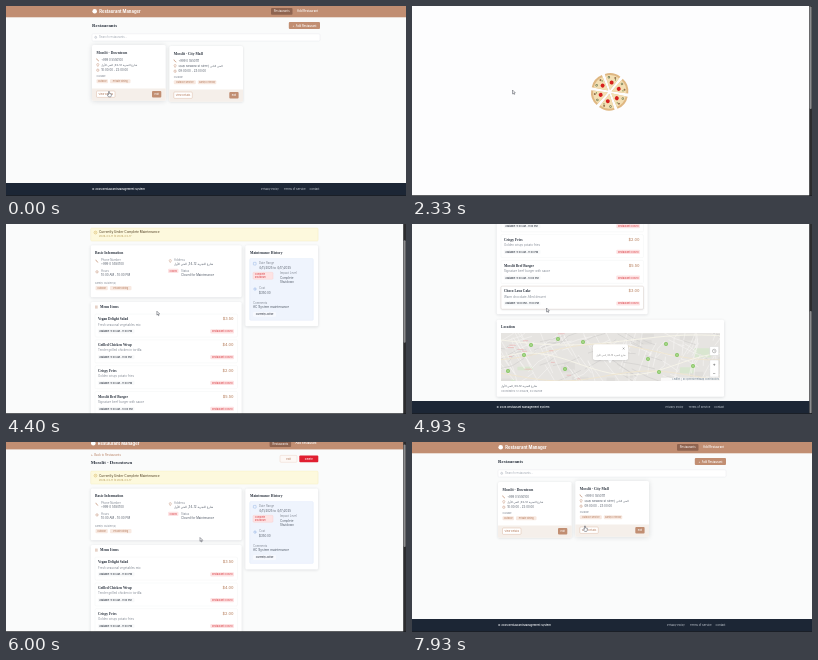
An HTML page with a canvas that plays this animation: 400 px wide and 190 px high, repeating every 8 s.

```html
<!DOCTYPE html>
<html lang="en">
<head>
<meta charset="utf-8">
<title>Restaurant Manager</title>
<style>
html, body { margin: 0; width: 100%; height: 100%; overflow: hidden; background: #fafbfb; }
canvas { display: block; width: 400px; height: 190px; }
</style>
</head>
<body>
<canvas id="stage"></canvas>
<script>
const W = 400, H = 190, LOOP = 8000, SCROLL_MAX = 160;
const LOADER_AT = 1000, DETAILS_AT = 3070, LIST_AT = 6930;
const canvas = document.getElementById('stage');
const ctx = canvas.getContext('2d');
const dpr = Math.max(1, window.devicePixelRatio || 1);
canvas.width = W * dpr;
canvas.height = H * dpr;

const BROWN = '#c18e72', DARK_BROWN = '#8f6450', INK = '#2b333f', BODY = '#505966', GRAY = '#838a95';
const PEACH = '#f8e9e1', TAN = '#b98366', RED = '#dc4a50', PINK = '#fde3e4';
const SANS = 'Inter, "DejaVu Sans", sans-serif';
const SERIF = '"Liberation Serif", serif';
const ADDRESS = 'شارع التجربة 12-34, الحي الأول';

// Keys are [time, ...values]; values ease between neighbouring keys.
function track(keys, t) {
  if (t <= keys[0][0]) return keys[0].slice(1);
  for (let i = 1; i < keys.length; i++) {
    if (t > keys[i][0]) continue;
    const a = keys[i - 1], b = keys[i];
    const p = (t - a[0]) / (b[0] - a[0]);
    const e = p * p * (3 - 2 * p);
    return a.slice(1).map((v, k) => v + (b[k + 1] - v) * e);
  }
  return keys[keys.length - 1].slice(1);
}

const pointerKeys = [
  [0, 102.5, 85.5], [500, 102.5, 85.5], [930, 100.5, 84], [3200, 100.5, 84],
  [3800, 152.5, 87.5], [4300, 152.5, 87.5], [4850, 134.5, 84], [5250, 134.5, 84],
  [5620, 194, 95.5], [6150, 194, 95.5], [6720, 277.5, 6], [7080, 277.5, 6], [7900, 172.5, 84]
];
const scrollKeys = [[4230, 0], [4860, SCROLL_MAX], [5350, SCROLL_MAX], [5670, 63], [6060, 0]];

function text(s, x, y, size, color = BODY, { weight = 400, font = SANS, align = 'left' } = {}) {
  ctx.font = `${weight} ${size}px ${font}`;
  ctx.textAlign = align;
  ctx.fillStyle = color;
  ctx.fillText(s, x, y);
}

const heading = (s, x, y, size) => text(s, x, y, size, INK, { weight: 700, font: SERIF });

function box(x, y, w, h, fill, { r = 1, stroke, line = 0.4, shadow = 0 } = {}) {
  ctx.save();
  if (shadow) {
    ctx.shadowColor = 'rgba(30,35,45,.15)';
    ctx.shadowBlur = shadow * dpr;
    ctx.shadowOffsetY = 0.6 * dpr;
  }
  ctx.beginPath();
  ctx.roundRect(x, y, w, h, r);
  ctx.fillStyle = fill;
  ctx.fill();
  ctx.restore();
  if (stroke) {
    ctx.strokeStyle = stroke;
    ctx.lineWidth = line;
    ctx.stroke();
  }
}

function pill(s, x, y, w, h, fill, color, { size = 2.25, weight = 500, ...style } = {}) {
  box(x, y, w, h, fill, style);
  text(s, x + w / 2, y + h / 2 + size * 0.36, size, color, { weight, align: 'center' });
}

function dot(x, y, r, fill) {
  ctx.beginPath();
  ctx.arc(x, y, r, 0, Math.PI * 2);
  ctx.fillStyle = fill;
  ctx.fill();
}

function path(points, color, width) {
  ctx.beginPath();
  points.forEach(([x, y], i) => i ? ctx.lineTo(x, y) : ctx.moveTo(x, y));
  ctx.strokeStyle = color;
  ctx.lineWidth = width;
  ctx.stroke();
}

function ring(x, y, color, r = 1.2) {
  ctx.beginPath();
  ctx.arc(x, y, r, 0, Math.PI * 2);
  ctx.strokeStyle = color;
  ctx.lineWidth = 0.45;
  ctx.stroke();
  path([[x, y - r / 2], [x, y], [x + r / 2, y + r / 3]], color, 0.35);
}

function phoneIcon(x, y, color) {
  path([[x - 1.2, y - 1.3], [x - 0.5, y + 0.2], [x + 1.2, y + 1.3]], color, 0.7);
}

function pinIcon(x, y, color) {
  path([[x, y + 1.5], [x - 1.1, y - 0.3], [x - 0.7, y - 1.3], [x + 0.7, y - 1.3], [x + 1.1, y - 0.3], [x, y + 1.5]], color, 0.45);
}

function header(dx) {
  ctx.fillStyle = BROWN;
  ctx.fillRect(0, 0, W, 11.3);
  dot(88.7 + dx, 5.2, 2.3, '#fff');
  text('Restaurant Manager', 93.2 + dx, 6.8, 4.2, '#fff', { weight: 700 });
  pill('Restaurants', 265 + dx, 2, 21.5, 6.8, DARK_BROWN, '#f3e8e2', { size: 2.8 });
  text('Add Restaurant', 291 + dx, 6.3, 2.85, '#fff', { weight: 500 });
}

function footer(y, dx) {
  ctx.fillStyle = '#1c2635';
  ctx.fillRect(0, y, W, 13);
  text('© 2025 Restaurant Management System', 86 + dx, y + 7.3, 2.7, '#e8ebef', { weight: 600 });
  text('Privacy Policy', 255 + dx, y + 7.2, 2.7, '#ccd2da');
  text('Terms of Service', 278 + dx, y + 7.2, 2.7, '#ccd2da');
  text('Contact', 303.5 + dx, y + 7.2, 2.7, '#ccd2da');
}

const restaurants = [
  { x: 86, name: 'Mosslit - Downtown', phone: '+999 0 5550100', address: ADDRESS,
    hours: '10:00:00 - 22:00:00', tags: [['Outdoor', 11.5], ['Private Dining', 20.5]] },
  { x: 163.3, name: 'Mosslit - City Mall', phone: '+999 0 5550111', address: 'Quay Meadow St Street, الحي الثاني',
    hours: '09:00:00 - 23:00:00', tags: [['Outdoor Service', 22], ['Family Friendly', 18.5]] }
];

function restaurantCard({ x, name, phone, address, hours, tags }, lift) {
  ctx.save();
  ctx.translate(x, -lift);
  box(0, 40, 73.7, 55.7, '#fff', { r: 1.5, shadow: 2.5 + lift * 2.5 });
  box(0, 83.5, 73.7, 12.2, '#f5efea', { r: [0, 0, 1.5, 1.5] });
  heading(name, 4.5, 48.5, 3.6);
  phoneIcon(5.8, 54.8, BROWN);
  pinIcon(5.8, 60, BROWN);
  ring(5.8, 65.2, BROWN);
  text(phone, 9.2, 55.7, 2.8);
  text(address, 9.2, 60.9, 2.7);
  text(hours, 9.2, 66.1, 2.85);
  text('CUISINE', 4.5, 72.3, 2.25, GRAY, { weight: 500 });
  let tx = 4.5;
  for (const [label, w] of tags) {
    pill(label, tx, 74.3, w, 4, PEACH, TAN);
    tx += w + 2;
  }
  pill('View Details', 4.5, 86, 18.5, 6.4, '#fff', TAN, { size: 2.5, stroke: '#d3ab94' });
  pill('Edit', 60, 86, 9.3, 6.4, BROWN, '#fff', { size: 2.5 });
  ctx.restore();
}

function listPage(lifts) {
  header(0);
  heading('Restaurants', 86, 21.3, 4.85);
  pill('+  Add Restaurant', 282.8, 16, 31.2, 7, BROWN, '#fff', { size: 2.8 });
  box(86, 27.8, 228, 7.3, '#fff', { r: 1.2, stroke: '#e3e6ea' });
  ring(89.7, 31.3, '#a4abb5', 1);
  text('Search restaurants...', 93, 32.4, 2.9, '#a4abb5');
  restaurants.forEach((r, i) => restaurantCard(r, lifts[i]));
  footer(177, 0);
}

function field(label, value, x, y) {
  text(label, x, y, 2.8, GRAY);
  text(value, x, y + 4.5, 2.95);
}

function basicInfo() {
  box(84.7, 50.3, 151, 51.8, '#fff', { r: 1.5, shadow: 3 });
  heading('Basic Information', 89, 59.2, 3.65);
  phoneIcon(91, 66, BROWN);
  pinIcon(164.3, 66, BROWN);
  ring(91, 76.8, BROWN);
  field('Phone Number', '+999 0 5550100', 95, 65.5);
  field('Address', ADDRESS, 168, 65.5);
  field('Hours', '10:00 AM - 10:00 PM', 95, 76.5);
  pill('Closed', 162, 73.7, 10.5, 4.3, PINK, RED);
  field('Status', 'Closed for Maintenance', 175, 76.5);
  text('Family Cuisine(s)', 89, 88.6, 2.6, GRAY);
  pill('Outdoor', 89.5, 91, 12.3, 4.2, PEACH, TAN);
  pill('Private Dining', 104, 91, 21.5, 4.2, PEACH, TAN);
}

function maintenance() {
  box(239.3, 50.3, 72.8, 81, '#fff', { r: 1.5, shadow: 3 });
  heading('Maintenance History', 244, 59.2, 3.6);
  box(243.7, 63.5, 63.6, 61.8, '#eff4fd', { r: 1.2, stroke: '#dde7f6' });
  box(247.4, 67.3, 2.7, 2.7, '#eff4fd', { r: 0.4, stroke: '#84a9e0' });
  field('Date Range', '4/11/2025 to 4/17/2025', 253, 69.1);
  box(247, 77.2, 20, 7, PINK, { stroke: '#f6c9cb' });
  text('Complete', 248.8, 80.2, 2.25, RED, { weight: 500 });
  text('Shutdown', 248.8, 83, 2.25, RED, { weight: 500 });
  field('Impact Level', 'Complete', 274, 79.2);
  text('Shutdown', 274, 87.8, 2.95);
  ring(249, 94, '#84a9e0');
  field('Cost', '$350.00', 253, 94.2);
  text('Comments', 247, 108.5, 2.8, GRAY);
  text('AC System maintenance', 247, 113, 3.15);
  pill('Currently Active', 247, 117, 23, 4.8, '#f7f9fe', INK);
}

const menu = [
  ['Vegan Delight Salad', '$3.50', 'Fresh seasonal vegetables mix', '9:00 AM - 11:00 PM'],
  ['Grilled Chicken Wrap', '$4.00', 'Tender grilled chicken in tortilla', '9:00 AM - 9:00 PM'],
  ['Crispy Fries', '$2.00', 'Golden crispy potato fries', '9:00 AM - 11:00 PM'],
  ['Mosslit Beef Burger', '$5.50', 'Signature beef burger with sauce', '9:00 AM - 10:00 PM'],
  ['Choco Lava Cake', '$3.00', 'Warm chocolate-filled dessert', '12:00 PM - 11:00 PM']
];

function menuCard(scroll, px, py) {
  const resting = scroll === 0 || scroll === SCROLL_MAX;
  box(84.7, 107, 151, 143.2, '#fff', { r: 1.5, shadow: 3 });
  for (let i = 0; i < 3; i++) path([[89, 111 + i], [91.7, 111 + i]], BROWN, 0.45);
  heading('Menu Items', 94, 113.3, 3.65);
  menu.forEach(([name, price, note, hours], i) => {
    const y = 119 + i * 25.8, top = y - scroll;
    const hover = resting && px > 89 && px < 232 && py > top && py < top + 23;
    box(89, y, 142.5, 23, '#fff', { r: 1.2, stroke: hover ? '#d5c8bf' : '#f0f1f3', shadow: hover ? 2 : 0 });
    heading(name, 92, y + 6.1, 3.5);
    text(price, 227.5, y + 6.2, 3.9, '#bd8a6b', { weight: 500, align: 'right' });
    text(note, 92, y + 11.5, 2.95, GRAY);
    box(92, y + 15.2, 36.5, 4.2, '#f8f9fa');
    text('Available: ' + hours, 93.3, y + 18.1, 2.3, INK, { weight: 500 });
    pill('Restaurant Closed', 204.3, y + 15.2, 23.7, 4.2, PINK, RED, { size: 2.35 });
  });
}

function seeded(seed) {
  return () => (seed = (seed * 16807) % 2147483647) / 2147483647;
}

const markers = [
  [146, 115], [119, 121], [112, 131], [171, 118], [254, 120], [265, 131],
  [236, 135], [247, 148], [281, 142], [96, 147], [153, 145]
];

function mapView() {
  const x = 89, y = 109, w = 219, h = 48;
  const rnd = seeded(91);
  ctx.save();
  ctx.beginPath();
  ctx.rect(x, y, w, h);
  ctx.clip();
  ctx.fillStyle = '#e6e4e1';
  ctx.fillRect(x, y, w, h);
  for (let i = 0; i < 16; i++) {
    box(x + rnd() * w, y + rnd() * h, 5 + rnd() * 12, 3 + rnd() * 7, i % 4 ? '#dfddda' : '#d9e6d0', { r: 1 });
  }
  for (let i = 0; i < 130; i++) {
    const cx = x + rnd() * w, cy = y + rnd() * h;
    const a = (cx < 200 ? -0.45 : 0.4) + (i % 2) * 1.5 + (rnd() - 0.5) * 0.4;
    const len = 5 + rnd() * 13, bend = (rnd() - 0.5) * 5;
    const ex = Math.cos(a) * len, ey = Math.sin(a) * len;
    path([[cx - ex, cy - ey], [cx + bend, cy + bend], [cx + ex, cy + ey]], i % 4 ? '#f6f5f4' : '#cfcdcb', 0.6);
  }
  for (let i = 0; i < 4; i++) {
    const road = [];
    for (let k = 0; k <= 24; k++) {
      road.push([x + k * w / 24, y + 7 + i * 12 + Math.sin(k * (0.22 + i * 0.035) + i * 1.9) * (5 + i % 3 * 3)]);
    }
    path(road, i % 2 ? '#f0e6d0' : '#f8f5ea', 0.9);
  }
  for (let i = 0; i < 12; i++) {
    const lx = x + rnd() * w * 0.35, ly = y + rnd() * h;
    path([[lx, ly], [lx + 3 + rnd() * 5, ly]], '#eab9b9', 0.8);
  }
  for (const [mx, my] of markers) {
    dot(mx, my, 2, '#86c662');
    dot(mx, my, 0.7, '#d8f0c7');
  }
  ctx.restore();

  ctx.beginPath();
  ctx.moveTo(195.5, 135.5);
  ctx.lineTo(198, 139.3);
  ctx.lineTo(200.5, 135.5);
  ctx.fillStyle = '#fff';
  ctx.fill();
  box(181, 120.3, 35, 15.7, '#fff', { r: 1.8, shadow: 2 });
  path([[210.7, 123.6], [212.5, 125.4]], '#777', 0.5);
  path([[212.5, 123.6], [210.7, 125.4]], '#777', 0.5);
  text(ADDRESS, 198.3, 131.5, 2.2, '#777', { align: 'center' });
  box(297.7, 122.5, 9, 9, '#fff', { r: 1, stroke: '#d0d0d0' });
  ring(302.2, 127, '#777', 1.8);
  box(297.7, 136, 9, 17, '#fff', { r: 1, stroke: '#d0d0d0' });
  text('+', 302.2, 142.3, 5, '#555', { align: 'center' });
  text('−', 302.2, 150.6, 5, '#555', { align: 'center' });
  box(249, 153.8, 59, 3.2, 'rgba(255,255,255,.8)', { r: 0 });
  text('Leaflet | © OpenStreetMap contributors', 307.3, 156.2, 2.5, '#5f7487', { align: 'right' });
}

function locationCard() {
  ctx.save();
  ctx.translate(0, SCROLL_MAX);
  box(84.7, 95.8, 227.4, 77, '#fff', { r: 1.5, shadow: 3 });
  heading('Location', 89, 104.3, 3.65);
  mapView();
  text(ADDRESS, 89, 162.8, 2.7);
  text('Coordinates: 12.345678, 23.456789', 89, 167.5, 2.45, GRAY);
  ctx.restore();
}

function detailsPage(scroll, px, py) {
  ctx.save();
  ctx.translate(0, -scroll);
  header(-1.4);
  text('← Back to Restaurants', 84.7, 17.9, 2.85, TAN);
  heading('Mosslit - Downtown', 84.7, 25.6, 4.85);
  pill('Edit', 274, 17.3, 17, 6.9, '#fdf8f5', TAN, { size: 2.6, stroke: '#e8cdbb' });
  pill('Delete', 293.3, 17.3, 19, 6.9, '#e01f30', '#fff', { size: 2.6 });
  box(84.7, 33, 227.4, 13, '#fdf9dd', { stroke: '#f4ebbb' });
  ring(89.5, 37.5, '#d0aa4c', 1.4);
  text('Currently Under Complete Maintenance', 93, 38.4, 3.2, '#66563a', { weight: 500 });
  text('2025-04-11 to 2025-04-17', 93, 42.4, 2.6, '#b59a57');
  basicInfo();
  maintenance();
  menuCard(scroll, px, py);
  locationCard();
  footer(337, -1.4);
  ctx.restore();
}

function pizza(t) {
  ctx.save();
  ctx.translate(197.7, 85.9);
  ctx.rotate(-1.4 + (t - 2330) * Math.PI * 2 / 3000);
  for (let i = 0; i < 6; i++) {
    ctx.save();
    ctx.rotate(i * Math.PI / 3);
    ctx.translate(2, 0);
    for (const [r, color] of [[16.8, '#dfb782'], [14.8, '#f3dfb4']]) {
      ctx.beginPath();
      ctx.moveTo(0, 0);
      ctx.arc(0, 0, r, -0.49, 0.49);
      ctx.closePath();
      ctx.fillStyle = color;
      ctx.fill();
    }
    dot(7.5, 0.3, 2, '#d6201f');
    dot(12.3, -3.3, 1.2, '#6d7951');
    dot(12.3, -3.3, 0.55, '#f3dfb4');
    dot(12.7, 3.1, 1, '#95704e');
    dot(10.8, 3.6, 0.6, '#5f7f3c');
    ctx.restore();
  }
  ctx.restore();
}

function scrollbar(scroll) {
  ctx.fillStyle = '#2c2c2e';
  ctx.fillRect(397.2, 0, 2.8, H);
  box(397.6, 0.5 + scroll * 0.54, 2, 102.5, '#8c8c8e', { r: 1 });
}

function status(alpha) {
  if (alpha <= 0) return;
  ctx.save();
  ctx.globalAlpha = Math.min(1, alpha);
  box(0, 185.8, 31, 4.2, '#77797c', { r: [0, 1, 0, 0] });
  text('localhost:3000/restaurants', 1, 188.6, 2.2, '#d8dadd');
  ctx.restore();
}

function pointer(x, y, hand) {
  ctx.save();
  ctx.translate(x, y);
  ctx.lineJoin = 'round';
  ctx.beginPath();
  const shape = hand
    ? [[0, 0], [0.9, 0], [1, 2], [2.9, 2.4], [2.8, 4.2], [2.2, 5.4], [0.1, 5.4], [-1.4, 3.4], [-0.9, 2.8], [0, 3.3]]
    : [[0, 0], [0, 3.9], [0.9, 3.1], [1.5, 4.5], [2.1, 4.2], [1.5, 2.9], [2.8, 2.8]];
  shape.forEach(([a, b]) => ctx.lineTo(a, b));
  ctx.closePath();
  ctx.fillStyle = '#fff';
  ctx.fill();
  ctx.strokeStyle = '#4a4f58';
  ctx.lineWidth = 0.5;
  ctx.stroke();
  ctx.restore();
}

function draw(t) {
  const [px, py] = track(pointerKeys, t);
  const [scroll] = track(scrollKeys, t);
  const loading = t >= LOADER_AT && t < DETAILS_AT;
  const details = t >= DETAILS_AT && t < LIST_AT;
  ctx.setTransform(dpr, 0, 0, dpr, 0, 0);
  ctx.fillStyle = loading ? '#fdfdfe' : '#fafbfb';
  ctx.fillRect(0, 0, W, H);

  if (loading) {
    pizza(t);
  } else if (details) {
    detailsPage(scroll, px, py);
  } else {
    const [lift] = track([[7840, 0], [7920, 1]], t);
    listPage([t < LOADER_AT ? 1 : 0, lift]);
  }
  if (loading || details) scrollbar(scroll);

  ctx.fillStyle = '#1b1d21';
  ctx.fillRect(0, 189.3, W, 0.7);
  if (t < LOADER_AT) status((t - 200) / 150);
  if (t > 6650 && t < 7400) status(Math.min((t - 6650) / 120, (7400 - t) / 200));

  const overNav = px > 264 && px < 287 && py < 9;
  const overButton = !loading && !details && py > 83 && py < 92 && (px < 109 || (px > 168 && px < 187));
  pointer(px, py, overNav || overButton);
}

function tick(now) {
  draw(now % LOOP);
  requestAnimationFrame(tick);
}
draw(0);
requestAnimationFrame(tick);
</script>
</body>
</html>
```
